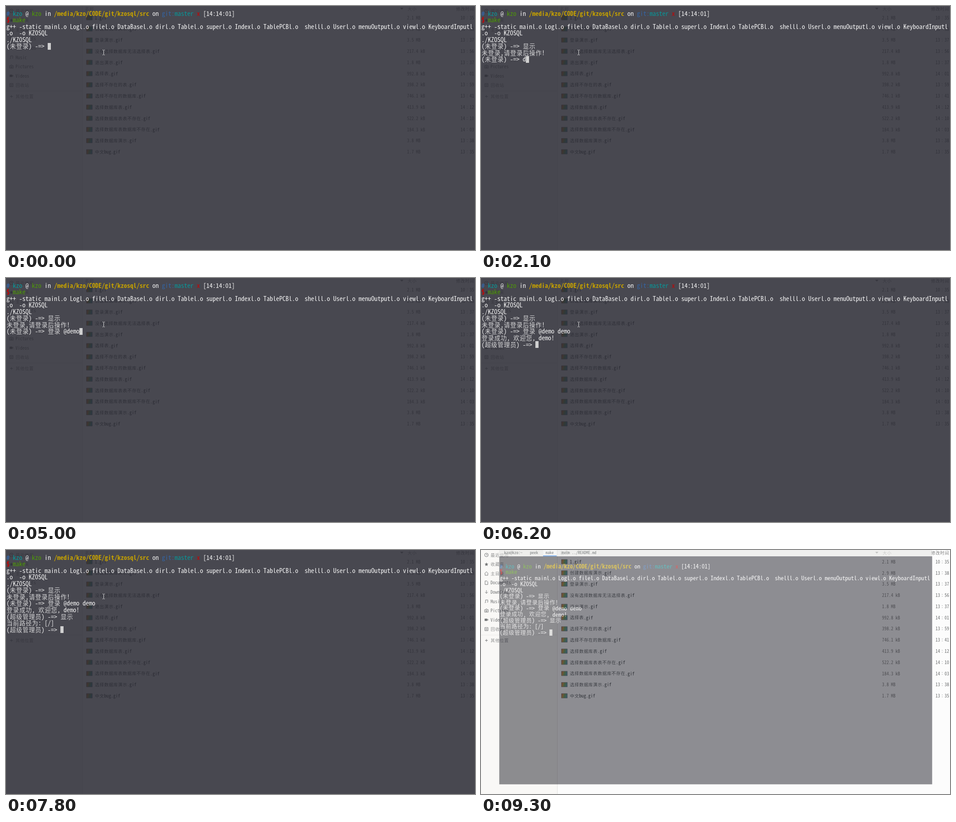
Recreate the animation shown at these times as an HTML page with a canvas. Size 1035x541 px, loop 9400 ms.

```html
<!DOCTYPE html>
<html lang="zh-CN">
<head>
<meta charset="utf-8">
<style>
html, body { margin: 0; width: 100%; height: 100%; overflow: hidden; background: #484850; }
canvas { display: block; }
</style>
</head>
<body>
<canvas id="stage" width="1035" height="541"></canvas>
<script>
const W = 1035, H = 541, LOOP = 9400, MINIMISE = 9300;
const MONO = '"Noto Sans Mono CJK SC", "Noto Sans CJK SC", "Noto Sans Mono", monospace';
const SANS = '"Noto Sans CJK SC", "Noto Sans", sans-serif';
const CELL = 7, ROW = 14.55, LEFT = 1, TOP = 9.2;

const stage = document.getElementById('stage').getContext('2d');
const makeLayer = () => Object.assign(document.createElement('canvas'), { width: W, height: H }).getContext('2d');
const terminalLayer = makeLayer(), filesLayer = makeLayer();

const WHITE = '#f4f4f4', BLUE = '#3465a4', CYAN = '#06989a', GREEN = '#4e9a06', RED = '#cc0000';
const PROMPT = [
  [BLUE, '# ', 'bold'], [CYAN, 'kzo'], [WHITE, ' @ '], [GREEN, 'kzo'], [WHITE, ' in '],
  ['#c4a000', '/media/kzo/CODE/git/kzosql/src', 'bold'], [WHITE, ' on '],
  [BLUE, 'git:'], [CYAN, 'master'], [RED, ' x '], [WHITE, '[14:14:01]']
];
const GUEST = '(未登录) -=> ', ADMIN = '(超级管理员) -=> ';

// Terminal output as [time, text]; \b removes the last character.
const OUTPUT = [
  [0, 'g++ -static mainl.o Logl.o filel.o DataBasel.o dirl.o Tablel.o superl.o Indexl.o TablePCBl.o  ' +
      'shelll.o Userl.o menuOutputl.o viewl.o KeyboardInputl\n.o  -o KZOSQL\n./KZOSQL\n' + GUEST],
  [800, '显示'], [1100, '\n未登录,请登录后操作!\n' + GUEST],
  [2100, 'd'], [2900, '\b'], [3700, '登录'], [3800, ' '], [4300, '@'],
  [4600, 'd'], [4700, 'e'], [4900, 'm'], [5000, 'o'], [5300, ' '],
  [5600, 'd'], [5800, 'e'], [5900, 'm'], [6000, 'o'],
  [6200, '\n登录成功, 欢迎您, demo!\n' + ADMIN],
  [7300, '显示'], [7800, '\n当前路径为: [/]\n' + ADMIN]
];
const PINYIN = [
  [0, ''], [100, 'x'], [200, 'xi'], [300, 'xian'], [500, 'xian s'], [700, 'xian shi'], [800, ''],
  [2900, 'd'], [3100, 'de'], [3200, 'deng'], [3400, 'deng l'], [3700, ''],
  [6600, 'x'], [6700, 'xi'], [6800, 'xian'], [6900, 'xian s'], [7000, 'xian sh'], [7100, 'xian shi'], [7300, '']
];
const XIANSHI = '显示 现实 先是 县市 现时 限时 现世';
const CANDIDATES = {
  'x': '下 想 小 向 像 先 新', 'xi': '系 西 洗 喜 细 戏 席', 'xian': '先 线 现 县 限 显 险',
  'xian s': XIANSHI, 'xian sh': XIANSHI, 'xian shi': XIANSHI,
  'd': '的 到 大 都 对 多 点', 'de': '的 得 德 地 嘚 锝 底', 'deng': '等 灯 登 邓 瞪 凳 蹬',
  'deng l': '登录 登陆 等来 等量 登临 瞪羚 瞪了'
};

const FILES = `1.gif|2.1 MB|10∶35
创建数据库演示.gif|2.9 MB|13∶38
登录演示.gif|3.5 MB|13∶37
没有选择数据库无法选择表.gif|217.4 kB|13∶56
退出演示.gif|1.8 MB|13∶37
选择表.gif|992.8 kB|14∶01
选择不存在的表.gif|398.2 kB|13∶59
选择不存在的数据库.gif|746.1 kB|13∶41
选择数据库表.gif|413.9 kB|14∶12
选择数据库表表不存在.gif|522.2 kB|14∶10
选择数据库表数据库不存在.gif|184.3 kB|14∶03
选择数据库演示.gif|3.8 MB|13∶38
中文bug.gif|1.7 MB|13∶35`.split('\n').map(line => line.split('|'));

const PLACES = [
  ['最近使用', 'M4 0a4 4 0 1 0-8 0a4 4 0 1 0 8 0M0-2V0H2'],
  ['收藏夹', 'M0-4L1.2-1.2L4-1L2 1L2.6 4L0 2.4L-2.6 4L-2 1L-4-1L-1.2-1.2Z', true],
  ['主目录', 'M-4 0L0-4L4 0M-3 0V4H3V0'],
  ['Documents', 'M-3-4H1L3-2V4H-3Z'],
  ['Downloads', 'M0-4V3M-3 0L0 3L3 0'],
  ['Music', 'M-2 3V-3H3V2M-2 3h-1.5M3 2h-1.5'],
  ['Pictures', 'M-4-2H-1.5L-1-3.5H1L1.5-2H4V3.5H-4ZM1.5.8a1.5 1.5 0 1 0-3 0a1.5 1.5 0 1 0 3 0'],
  ['Videos', 'M-4-2.5H2V2.5H-4ZM2 0L4-2V2Z', true],
  ['回收站', 'M-3.5-3.5H3.5V3.5H-3.5ZM-2-1H2M-2 1.5H2'],
  ['其他位置', 'M0-3V3M-3 0H3']
];

const isWide = char => /[\u2236\u2e80-\uffff]/.test(char);

// Draws text on a grid where wide characters take two cells; returns the end x.
// Wide characters are set a little smaller and paler to look thin-stroked.
function drawCells(g, text, x, y, cell, color) {
  const font = g.font;
  const thinFont = '300 ' + (cell * 1.88).toFixed(1) + 'px ' + SANS;
  g.fillStyle = color;
  g.textAlign = 'center';
  for (const char of text) {
    const wide = isWide(char), width = wide ? cell * 2 : cell;
    g.font = wide ? thinFont : font;
    g.globalAlpha = wide ? .82 : 1;
    g.fillText(char, x + width / 2, y - (wide ? cell * .04 : 0));
    x += width;
  }
  g.font = font;
  g.globalAlpha = 1;
  return x;
}

function box(g, x, y, w, h, radius, fill, stroke) {
  g.beginPath();
  g.roundRect(x, y, w, h, radius);
  g.fillStyle = fill;
  g.fill();
  if (stroke) {
    g.strokeStyle = stroke;
    g.lineWidth = 1;
    g.stroke();
  }
}

function drawThumbnail(g, x, y) {
  const shade = g.createLinearGradient(x, y, x + 13, y + 3);
  [[0, '#a8563c'], [.35, '#b98a3c'], [.6, '#679a50'], [1, '#4a93a0']].forEach(stop => shade.addColorStop(...stop));
  box(g, x, y, 14, 11, 1, '#858585');
  g.fillStyle = shade;
  g.fillRect(x + 1, y + 1, 12, 9);
}

function drawFiles(g) {
  const faint = '#8a8c8c';
  g.fillStyle = '#fcfcfc';
  g.fillRect(0, 0, W, H);
  g.fillStyle = '#f9f8f6';
  g.fillRect(0, 0, 168, H);
  g.fillStyle = '#e2e1df';
  g.fillRect(168, 0, 1, H);
  g.fillStyle = '#ecebe9';
  g.fillRect(0, 188, 168, 1);

  g.font = '10px ' + MONO;
  PLACES.forEach(([name, path, solid], i) => {
    const y = i < 9 ? 11 + i * 20.55 : 200.5;
    drawCells(g, name, 21, y + 3.8, 5, '#77797a');
    g.save();
    g.translate(12, y);
    g.strokeStyle = '#77797a';
    g[solid ? 'fill' : 'stroke'](new Path2D(path));
    g.restore();
  });

  drawCells(g, '名称', 174, 9.8, 5, faint);
  drawCells(g, '大小', 886, 9.8, 5, faint);
  drawCells(g, '修改时间', 993, 9.8, 5, '#666');
  g.fillStyle = faint;
  g.fill(new Path2D('M870 4H877L873.5 8Z'));
  FILES.forEach(([name, size, time], i) => {
    const y = 26 + i * 24.78;
    drawThumbnail(g, 177, y - 5.5);
    drawCells(g, name, 196, y + 3.8, 5.1, '#2e3436');
    drawCells(g, size, 885, y + 3.8, 4.95, '#777');
    drawCells(g, time, 1003, y + 3.8, 5, '#6a6c6d');
  });
}

function drawTabs(g) {
  g.fillStyle = '#e8e8e6';
  g.fillRect(40, 0, 955, 14);
  g.fillStyle = '#f4f4f4';
  g.fillRect(137, 0, 30, 14);
  g.fillStyle = '#3584e4';
  g.fillRect(137, 12, 30, 2);
  g.font = '9px ' + MONO;
  [['kzo@kzo:~', 51], ['peek', 108], ['make', 142.5], ['nvim ../README.md', 178]]
    .forEach(([title, x]) => drawCells(g, title, x, 9, 4.5, '#2e3436'));
}

function textAt(t) {
  let text = '';
  for (const [time, part] of OUTPUT) {
    if (time <= t) text = part === '\b' ? text.slice(0, -1) : text + part;
  }
  return text;
}

// Draws the terminal and returns the position of its text cursor.
function drawTerminal(g, t) {
  const baseline = row => Math.round(TOP + row * ROW + 12.4);
  g.fillStyle = 'rgba(40, 40, 50, .85)';
  g.fillRect(0, -6.7, W, H + 6.7);

  let x = LEFT;
  for (const [color, text, weight = ''] of PROMPT) {
    g.font = `${weight} 14px ${MONO}`;
    x = drawCells(g, text, x, baseline(0), CELL, color);
  }
  g.font = 'bold 14px ' + MONO;
  x = drawCells(g, '$ ', LEFT, baseline(1), CELL, RED);
  g.font = '14px ' + MONO;
  drawCells(g, 'make', x, baseline(1), CELL, GREEN);

  const lines = textAt(t).split('\n');
  lines.forEach((line, i) => x = drawCells(g, line, LEFT, baseline(i + 2), CELL, WHITE));
  const y = TOP + (lines.length + 1) * ROW;
  g.fillStyle = '#d0d0d0';
  g.fillRect(x, Math.round(y), CELL, 15);
  return { x, y };
}

function drawChevron(g, x, y, side, color) {
  g.strokeStyle = color;
  g.lineWidth = 1.3;
  g.stroke(new Path2D(`M${x - side * 1.7} ${y - 3.2}L${x + side * 1.7} ${y}L${x - side * 1.7} ${y + 3.2}`));
}

function drawPopup(g, pinyin, caret) {
  const words = CANDIDATES[pinyin].split(' ');
  const pitch = 15.1 + 8.1 * words[0].length;
  const left = caret.x - 13, tip = caret.y + ROW, top = tip + 6.4;
  const middle = caret.x + 3.5;

  box(g, left, top, 39 + 7 * pitch, 36, 4, '#f6f5f4');
  g.fill(new Path2D(`M${middle - 6.5} ${top + .5}L${middle} ${tip}L${middle + 6.5} ${top + .5}Z`));

  g.font = '7.6px "Noto Sans", sans-serif';
  g.textAlign = 'left';
  g.fillStyle = '#2e3436';
  g.fillText(pinyin, left + 4, top + 12);
  g.fillRect(left + 4.5 + g.measureText(pinyin).width, top + 12, 3, 1);

  box(g, left + 4, top + 16, pitch, 15, 2.5, '#3584e4');
  g.font = '8.1px ' + SANS;
  words.forEach((word, i) => {
    const x = left + 4 + i * pitch, y = top + 26;
    drawCells(g, String(i + 1), x + 3.5, y, 4.05, i ? '#2e3436' : '#17304f');
    drawCells(g, word, x + 11.2, y, 4.05, i ? '#2e3436' : '#fff');
  });

  const buttons = left + 8 + 7 * pitch, y = top + 23.5;
  box(g, buttons, y - 7.5, 13, 15, [2, 0, 0, 2], '#f4f3f2', '#dad7d4');
  box(g, buttons + 13, y - 7.5, 13, 15, [0, 2, 2, 0], '#fbfbfa', '#cdc7c2');
  drawChevron(g, buttons + 6.5, y, -1, '#929595');
  drawChevron(g, buttons + 19.5, y, 1, '#2e3436');
}

function drawPointer(g, t) {
  const step = Math.min(8, Math.max(0, Math.floor((t - 8100) / 100))) / 8;
  const u = step * step * (3 - 2 * step), v = 1 - u;
  const along = (from, bend, to) => v * v * from + 2 * u * v * bend + u * u * to;
  g.save();
  g.translate(along(215.5, 262, 46.5), along(103, 50, 1));
  g.strokeStyle = '#dcdcdc';
  g.lineWidth = 1;
  g.stroke(new Path2D('M-2.5-5.5H-1L0-4.5L1-5.5H2.5M0-4.5V4.5M-2.5 5.5H-1L0 4.5L1 5.5H2.5'));
  g.restore();
}

function draw() {
  const t = performance.now() % LOOP;
  const minimising = t >= MINIMISE;
  const g = terminalLayer;

  g.clearRect(0, 0, W, H);
  g.save();
  if (minimising) {
    drawTabs(g);
    g.translate(40.3, 20.2);
    g.scale(.923, .923);
  }
  const caret = drawTerminal(g, t);
  g.restore();

  stage.drawImage(filesLayer.canvas, 0, 0);
  stage.globalAlpha = minimising ? .61 : 1;
  stage.drawImage(g.canvas, 0, 0);
  stage.globalAlpha = 1;

  const pinyin = PINYIN.filter(([time]) => time <= t).pop()[1];
  if (t < 9100) drawPointer(stage, t);
  if (pinyin) drawPopup(stage, pinyin, caret);
  requestAnimationFrame(draw);
}

drawFiles(filesLayer);
draw();
</script>
</body>
</html>
```
